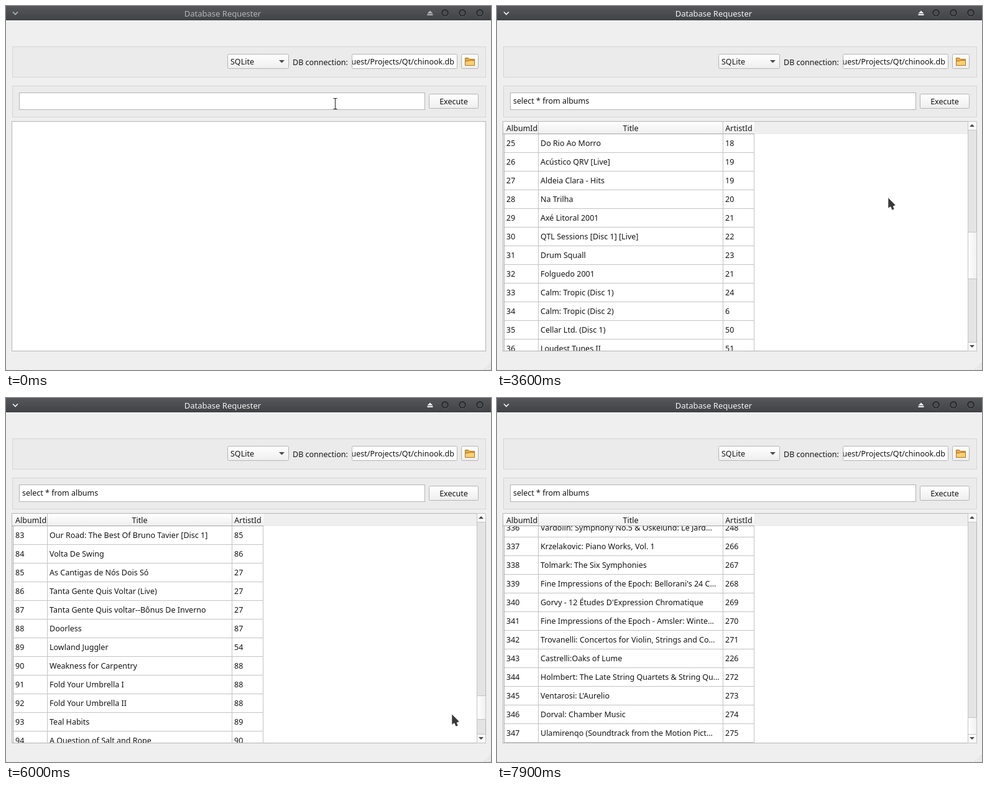
Animation, 780 px wide and 585 px high, one loop 8 s. Source, as an HTML page:

```html
<!DOCTYPE html>
<html>
<head>
<meta charset="utf-8">
<title>Database Requester</title>
<style>
html, body { margin: 0; width: 100%; height: 100%; overflow: hidden; background: #efefef; }
svg { display: block; }
text { font: 12.5px "Noto Sans", "Open Sans", sans-serif; fill: #141414; white-space: pre; }
rect, .grid { shape-rendering: crispEdges; }
.panel { fill: #ebebeb; stroke: #d5d5d5; }
.field { fill: #fff; stroke: #b4b4b4; }
.soft { stroke: #b4b4b4; shape-rendering: auto; }
.grid { stroke: #c3c3c3; fill: none; }
#bar text { font-size: 13px; }
</style>
</head>
<body>
<svg width="780" height="585" viewBox="0 0 780 585">
  <defs>
    <linearGradient id="dark" x2="0" y2="1"><stop stop-color="#55575a"/><stop offset="1" stop-color="#404245"/></linearGradient>
    <linearGradient id="light" x2="0" y2="1"><stop stop-color="#fff"/><stop offset="1" stop-color="#eee"/></linearGradient>
    <linearGradient id="side"><stop stop-color="#fff"/><stop offset="1" stop-color="#f0f0f0"/></linearGradient>
    <clipPath id="view"><rect x="10" y="206" width="404" height="348"/></clipPath>
    <clipPath id="path"><rect x="557" y="78" width="168" height="23"/></clipPath>
    <g id="knob"><circle cy="1" r="5.500" fill="none" stroke="#65676a"/><circle r="5" fill="#4b4d50" stroke="#202123" stroke-width="1.500"/></g>
  </defs>

  <g id="bar">
    <rect width="780" height="23" fill="url(#dark)"/>
    <rect y="22" width="780" height="1" fill="#393b3d"/>
    <path id="chevron" d="M11 9.500l4 4 4-4" fill="none" stroke-width="1.700"/>
    <text id="caption" x="348.500" y="17" text-anchor="middle">Database Requester</text>
    <path id="eject" d="M677.500 12l4.500-4.500 4.500 4.500zM677.500 13h9v2h-9z"/>
    <use href="#knob" x="706" y="11"/><use href="#knob" x="734" y="11"/><use href="#knob" x="762" y="11"/>
  </g>

  <rect class="panel" x="10.500" y="65.500" width="761" height="49"/>
  <rect class="soft" x="356.500" y="77.500" width="98" height="23" rx="2" fill="url(#light)"/>
  <text x="361" y="94">SQLite</text>
  <path d="M439 87h9l-4.500 4.500z" fill="#4a4a4a"/>
  <text x="461" y="95">DB connection:</text>
  <rect class="field soft" x="556.500" y="77.500" width="169" height="23" rx="2"/>
  <g clip-path="url(#path)"><text x="721" y="94" text-anchor="end">guest/Projects/Qt/chinook.db</text></g>
  <rect class="soft" x="732.500" y="77.500" width="27" height="23" rx="2" fill="url(#light)"/>
  <path d="M738.500 95.500v-12h5l2 2h8v10z" fill="#e9a83c" stroke="#a8762a"/>
  <path d="M738.500 95.500v-7h5l2-1h8v8z" fill="#fdcf6d" stroke="#a8762a"/>

  <rect class="panel" x="10.500" y="128.500" width="761" height="50"/>
  <rect class="field" x="21.500" y="139.500" width="652" height="27"/>
  <text id="query" x="26" y="157">select * from albums</text>
  <rect id="caret" y="144" width="1" height="16" fill="#111"/>
  <rect id="button" class="soft" x="680.500" y="141.500" width="79" height="23" rx="2"/>
  <text x="720" y="158" text-anchor="middle">Execute</text>

  <rect class="field" x="9.500" y="185.500" width="762" height="369"/>
  <g id="table">
    <rect x="10" y="186" width="747" height="20" fill="#efefef"/>
    <rect x="10" y="186" width="404" height="20" fill="url(#light)"/>
    <g id="rows" clip-path="url(#view)"></g>
    <path class="grid" d="M66.500 186v368M363.500 186v368M413.500 206v348M757.500 186v368"/>
    <path class="grid" d="M10 205.500h404M11.500 206v348" style="stroke:#a6a6a6"/>
    <text x="15" y="201">AlbumId</text>
    <text x="215" y="201" text-anchor="middle">Title</text>
    <text x="389" y="201" text-anchor="middle">ArtistId</text>
    <rect x="758" y="186" width="13" height="368" fill="#e4e4e4"/>
    <rect class="grid" x="757.500" y="185.500" width="14" height="14" style="fill:#fafafa"/>
    <rect class="grid" x="757.500" y="540.500" width="14" height="14" style="fill:#fafafa"/>
    <path d="M760 194h8l-4-4zM760 545h8l-4 4z" fill="#444"/>
    <rect id="handle" class="grid" x="757.500" width="14" style="fill:url(#side)"/>
  </g>
  <path d="M769 583.500h10M772 580.500h7M775 577.500h4M778 574.500h1" stroke="#b5b5b5" stroke-dasharray="1 2"/>
  <path id="beam" d="M-3-8.500h6M0-8v16M-3 8.500h6" fill="none" stroke="#222"/>
  <path id="arrow" d="M0 0v17l4-2.500 2.500 5.500 3.500-1.500-2-4.500 4-2z" fill="#37393b" stroke="#e8e8e8" stroke-width=".6"/>
</svg>
<script>
const LOOP = 8000, ROW = 30, PAGE = 11, VIEW = 348;
const $ = id => document.getElementById(id);

// Consecutive albums; the artist number counts up unless given after @
const albums = {};
function list(first, titles) {
  let artist = 0;
  titles.split('|').forEach((entry, i) => {
    const [title, id] = entry.split('@');
    artist = id ? +id : artist + 1;
    albums[first + i] = [title, artist];
  });
}
list(25, 'Do Rio Ao Morro@18|Acústico QRV [Live]|Aldeia Clara - Hits@19|Na Trilha|Axé Litoral 2001|QTL Sessions [Disc 1] [Live]|Drum Squall|Folguedo 2001@21|Calm: Tropic (Disc 1)@24|Calm: Tropic (Disc 2)@6|Cellar Ltd. (Disc 1)@50|Loudest Tunes II|Loudest Wink|Edge of the Valley|Intercoastal Supertunes|Onto The Ridge|Seus Caminhos|Nossa Travessia|RV III The Lost Rehearsal [Disc 1]|Magnetic Pottery [Disc 1]@22|Marchas De Bairro 2001@21|Undermeadow@59|The Best of Al Vendi@37|The Essential Corin Halve [Disc 1]@68');
list(83, 'Our Road: The Best Of Bruno Tavier [Disc 1]@85|Volta De Swing|As Cantigas de Nós Dois Só@27|Tanta Gente Quis Voltar (Live)@27|Tanta Gente Quis voltar--Bônus De Inverno@27|Doorless@87|Lowland Juggler@54|Weakness for Carpentry@88|Fold Your Umbrella I@88|Fold Your Umbrella II@88|Teal Habits|A Question of Salt and Rope');
list(112, 'The Weight of The Heron@90|The Q Divisor@90|Lateral XI@90|Jam Tractor|Intermission On Harbor Hill|Kalibrated@92|The Detour Of The Lake Plumber@92|Go North|Are We Laminated?|Fishing with the Tailor (Remastered)|Davio Lum Tar 25 Anos@46|Zeta Bloco-1995@96');
list(336, 'Vardolin: Symphony No.5 & Oskelund: Le Jard…@248|Krzelakovic: Piano Works, Vol. 1@266|Tolmark: The Six Symphonies|Fine Impressions of the Epoch: Bellorani\'s 24 C…|Gorvy - 12 Études D\'Expression Chromatique|Fine Impressions of the Epoch - Amsler: Winte…|Trovanelli: Concertos for Violin, Strings and Co…|Castrelli:Oaks of Lume@226|Holmbert: The Late String Quartets & String Qu…@272|Ventarosi: L\'Aurelio|Dorval: Chamber Music|Ulamirenqo (Soundtrack from the Motion Pict…');

// The other albums are put together from words
const heads = 'Paper,Copper,Sideways,Borrowed,Velvet,Crooked,Patient,Northern,Wooden,Folded,Salted'.split(',');
const tails = 'Ladders,Orchard Songs,Kettle,Lanterns of Clay,Meadow,Tramlines,Windmill Suite'.split(',');
const album = n => albums[n] || [
  heads[n * 7 % 11] + ' ' + tails[n * 3 % 7] + (n % 5 ? '' : ' [Disc 1]'),
  Math.ceil(n * .75)
];

// Moves: from, to, then where it arrives; each one slows down
const mouse = [[0, 0, 529, 157], [1900, 2400, 729, 151], [3000, 3300, 687, 265], [3400, 3600, 629, 308],
  [3900, 4600, 653, 425], [4700, 5100, 739, 504], [5700, 6000, 717, 508], [6400, 7000, 769, 511], [7300, 7900, 782, 590]];
const scroll = [[0, 0, 0], [3400, 3700, 27], [3900, 4600, 36], [5200, 5400, 48], [5700, 6000, 82],
  [6100, 6200, 85], [6400, 7300, 114], [7300, 7900, 336]];

function at(moves, t) {
  const i = moves.findLastIndex(m => m[0] <= t);
  const [from, to, ...end] = moves[i];
  if (t >= to) return end;
  const left = ((to - t) / (to - from)) ** 2;
  return end.map((v, j) => Math.round(v + (moves[i - 1][j + 2] - v) * left));
}

const rows = Array.from({ length: 13 }, () => {
  $('rows').insertAdjacentHTML('beforeend',
    '<g><text x="15" y="19"/><text x="70" y="19"/><text x="367" y="19"/><path class="grid" d="M12 29.500h402"/></g>');
  return $('rows').lastChild;
});

const show = (id, on) => $(id).style.display = on ? '' : 'none';
const set = (el, attrs) => { for (const k in attrs) el.setAttribute(k, attrs[k]); };

function drawTable(t) {
  const [top] = at(scroll, t);
  // More records are fetched as the end comes near
  const total = t < 5300 ? 50 : t < 6400 ? 100 : t < 7400 ? 130 : top + PAGE;
  const y = Math.min(top * ROW, total * ROW - VIEW), first = Math.floor(y / ROW);
  rows.forEach((g, i) => {
    const n = first + i + 1;
    set(g, { transform: `translate(0 ${206 + (n - 1) * ROW - y})`, visibility: n > total ? 'hidden' : 'visible' });
    [n, ...album(n)].forEach((s, j) => g.children[j].textContent = s);
  });
  const size = Math.max(27, Math.round(341 * PAGE / total));
  set($('handle'), { y: 199.5 + Math.round((341 - size) * top / (total - PAGE)), height: size });
}

function draw(t) {
  const active = t >= 800, typed = t >= 1600;
  const ink = active ? '#f4f4f4' : '#b4b5b6';
  $('caption').style.fill = $('eject').style.fill = $('chevron').style.stroke = ink;
  show('query', typed);
  show('caret', active && t < 1400 || typed && t < 2100);
  set($('caret'), { x: typed ? 145 : 26 });
  set($('button'), { fill: t === 2700 ? '#dedede' : 'url(#light)' });
  show('table', t >= 2800);
  if (t >= 2800) drawTable(t);
  const [x, y] = at(mouse, t), beam = x < 674 && t < 2400;
  show('beam', beam);
  show('arrow', !beam);
  set($(beam ? 'beam' : 'arrow'), { transform: `translate(${beam ? x + .5 : x} ${y})` });
}

const start = performance.now();
function tick() {
  const t = (performance.now() - start) % LOOP;
  draw(Math.floor(t / 100) * 100);
  requestAnimationFrame(tick);
}
tick();
</script>
</body>
</html>
```
